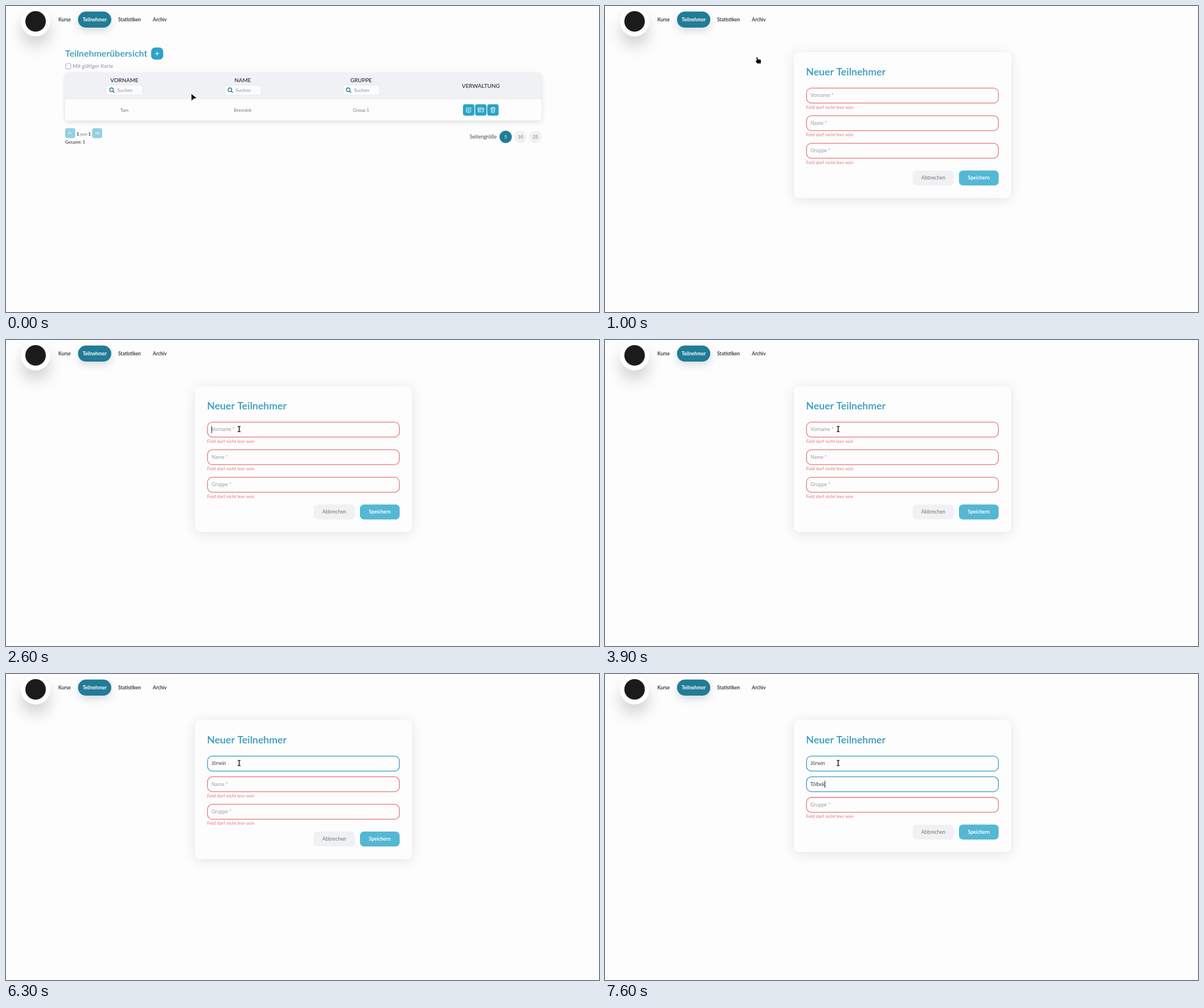
These frames come from a looping animation (1042 px wide and 538 px high, 8000 ms). An HTML page with a canvas:

```html
<!DOCTYPE html>
<html lang="de">
<head>
<meta charset="utf-8">
<style>
  html, body { margin: 0; width: 100%; height: 100%; overflow: hidden; background: #fdfdfd; }
  canvas { display: block; }
</style>
</head>
<body>
<canvas id="stage" width="1042" height="538"></canvas>
<script>
const ctx = document.getElementById('stage').getContext('2d');
const LOOP = 8000, STEP = 100;
const C = {
  page: '#fdfdfd', deep: '#217c97', teal: '#2ba3c7', title: '#349bbf', soft: '#54b7d4',
  pale: '#94d0e1', red: '#e4767a', ink: '#25292f', mid: '#6f7479', hint: '#9a9da3', chip: '#f0f1f3'
};

const FIRST = { word: 'Jörwin', keys: [4200, 4400, 4700, 4800, 5000, 5200] };
const LAST = { word: 'Tölbek', keys: [6700, 6900, 7100, 7300, 7400, 7600] };
const LIST_END = 900, FORM_START = 1000;

function text(str, x, y, size, color, weight = 400, align = 'left') {
  ctx.font = `${weight} ${size}px Lato, "Open Sans", sans-serif`;
  ctx.fillStyle = color;
  ctx.textAlign = align;
  ctx.fillText(str, x, y);
  return ctx.measureText(str).width;
}

function box(x, y, w, h, r, fill, stroke, line = 1) {
  ctx.beginPath();
  ctx.roundRect(x, y, w, h, r);
  if (fill) { ctx.fillStyle = fill; ctx.fill(); }
  if (stroke) { ctx.strokeStyle = stroke; ctx.lineWidth = line; ctx.stroke(); }
}

function disc(x, y, r, fill) {
  ctx.beginPath();
  ctx.arc(x, y, r, 0, Math.PI * 2);
  ctx.fillStyle = fill;
  ctx.fill();
}

function shadowed(color, blur, dy, draw) {
  ctx.save();
  ctx.shadowColor = color;
  ctx.shadowBlur = blur;
  ctx.shadowOffsetY = dy;
  draw();
  ctx.restore();
}

// Strokes an SVG path placed at x, y.
function line(d, x, y, color, width = 1) {
  ctx.save();
  ctx.translate(x, y);
  ctx.strokeStyle = color;
  ctx.lineWidth = width;
  ctx.lineCap = ctx.lineJoin = 'round';
  ctx.stroke(new Path2D(d));
  ctx.restore();
}

function shape(d, x, y, color) {
  ctx.save();
  ctx.translate(x, y);
  ctx.fillStyle = color;
  ctx.fill(new Path2D(d));
  ctx.restore();
}

function drawNav() {
  shadowed('rgba(0,0,0,.17)', 26, 17, () => disc(52, 28, 25.5, '#fff'));
  disc(52, 27, 18, '#1b1b1b');
  shadowed('rgba(30,60,80,.17)', 14, 6, () => box(126.5, 9.8, 58.5, 28.2, 14, C.deep));
  text('Kurse', 92, 27, 8.6, C.ink, 600);
  text('Teilnehmer', 155.8, 27, 8.6, '#fff', 700, 'center');
  text('Statistiken', 197, 27, 8.6, C.ink, 600);
  text('Archiv', 258, 27, 8.6, C.ink, 600);
}

function drawColumn(label, x, value) {
  text(label, x, 134.3, 9.8, C.ink, 500, 'center');
  box(x - 32, 139, 64.5, 18, 4, '#fafbfb', '#e6e8eb');
  line('M2.3 2.3 L4.8 4.8 M3.2 0 A3.2 3.2 0 1 1 -3.2 0 A3.2 3.2 0 1 1 3.2 0', x - 22.6, 147.2, C.deep, 1.4);
  text('Suchen', x - 12.4, 150.8, 8.4, '#8d9196');
  text(value, x, 185.5, 7.9, C.mid, 400, 'center');
}

function drawList() {
  text('Teilnehmerübersicht', 103.8, 89.3, 16.1, C.title, 600);
  box(255, 73, 21.3, 21.2, 7, C.teal);
  line('M-3.5 0 H3.5 M0 -3.5 V3.5', 265.5, 83.6, '#fff', 1);
  box(105, 101.5, 9, 9, 1.3, '#fff', '#a3a6aa');
  text('Mit gültiger Karte', 117, 109.3, 9, '#a8abaf', 700);

  shadowed('rgba(0,0,0,.12)', 9, 3, () => box(104, 117, 837, 84.5, 5, C.page));
  box(104, 117, 837, 47, [5, 5, 0, 0], '#f0f1f4');
  drawColumn('VORNAME', 208, 'Tam');
  drawColumn('NAME', 416, 'Brennlok');
  drawColumn('GRUPPE', 624, 'Group 1');
  text('VERWALTUNG', 834.3, 144, 9.8, C.ink, 500, 'center');

  for (let i = 0; i < 3; i++) box(803 + i * 21.3, 172.7, 20, 20, 4, C.teal);
  line('M-0.5 -3.5 H-3 Q-4 -3.5 -4 -2.5 V3 Q-4 4 -3 4 H2.5 Q3.5 4 3.5 3 V0.5 M-1.5 1.5 L-1 -0.5 L3 -4.5 L4.6 -3 L0.6 1 Z', 813, 182.7, '#fff');
  line('M-4.2 -3.5 H4.2 Q4.7 -3.5 4.7 -3 V3 Q4.7 3.5 4.2 3.5 H-4.2 Q-4.7 3.5 -4.7 3 V-3 Q-4.7 -3.5 -4.2 -3.5 M-4.5 -1 H4.5 M-2.8 1.4 H-0.5', 834.3, 182.7, '#fff');
  line('M-4 -3 H4 M-1.5 -3 V-4.5 H1.5 V-3 M-3.2 -3 L-2.8 4.5 H2.8 L3.2 -3 M-1 -1 V2.5 M1 -1 V2.5', 855.6, 182.7, '#fff', 0.9);

  box(104, 214.7, 17.7, 17.5, 4, C.pale);
  box(151.3, 214.7, 17.7, 17.5, 4, C.pale);
  line('M3.2 0 H-3.2 M-0.8 -2.4 L-3.2 0 L-0.8 2.4', 112.8, 223.4, '#fff', 0.8);
  line('M-3.2 0 H3.2 M0.8 -2.4 L3.2 0 L0.8 2.4', 160.1, 223.4, '#fff', 0.8);
  text('1', 124, 228, 7.9, C.ink, 600);
  text('von', 136.4, 228, 7.9, C.mid, 400, 'center');
  text('1', 149, 228, 7.9, C.ink, 600, 'right');
  text('Gesamt: 1', 104, 242.2, 7.8, '#55595f', 700);

  text('Seitengröße', 814.7, 233.2, 9, '#43474d');
  ['5', '10', '25'].forEach((n, i) => {
    const x = 878 + i * 26.1;
    disc(x, 230.1, 10.8, i ? C.chip : C.deep);
    text(n, x, 233.2, 8.3, i ? C.mid : '#fff', 400, 'center');
  });
}

const typed = ({ word, keys }, t) => word.slice(0, keys.filter(k => k <= t).length);

// Index of the field with a visible caret, or -1.
function caretField(t) {
  if (t >= 2600 && t < 3400) return 0;
  if (t >= FIRST.keys[0] && t < 5700) return 0;
  if (t >= 5800 && t < 6300 || t >= LAST.keys[0]) return 1;
  return -1;
}

function drawForm(t) {
  const fields = [['Vorname *', typed(FIRST, t)], ['Name *', typed(LAST, t)], ['Gruppe *', '']];
  const heights = fields.map(([, value]) => value ? 36.3 : 48.5);
  const buttonsY = 144 + heights.reduce((a, b) => a + b);

  shadowed('rgba(40,40,90,.12)', 20, 3, () => box(332, 81, 381.7, buttonsY + 48 - 81, 9, C.page));
  text('Neuer Teilnehmer', 353.3, 121.5, 17.75, C.title, 600);

  let y = 144;
  fields.forEach(([label, value], i) => {
    box(354.1, y + 0.4, 337.2, 26.2, 8.5, C.page, value ? C.title : C.red, 1.3);
    const width = text(value || label, 361, y + 16.3, 8.8, value ? '#3f444a' : C.hint);
    if (!value) text('Feld darf nicht leer sein', 353.5, y + 36.6, 8.1, C.red);
    if (caretField(t) === i) {
      ctx.fillStyle = '#222';
      ctx.fillRect(Math.round(361 + (value ? width : 0)), y + 7.3, 1, 12.5);
    }
    y += heights[i];
  });

  box(540.5, buttonsY - 0.3, 72.7, 26.3, 7, C.chip);
  text('Abbrechen', 576.9, buttonsY + 15.8, 8.8, C.mid, 400, 'center');
  box(622, buttonsY - 0.3, 69.7, 26.3, 7, C.soft);
  text('Speichern', 656.8, buttonsY + 15.8, 8.6, '#fff', 700, 'center');
}

function glide(t, start, end, from, to) {
  const p = Math.min(1, Math.max(0, (t - start) / (end - start)));
  const e = p * p * (3 - 2 * p);
  return from.map((v, i) => v + (to[i] - v) * e);
}

function drawCursor(t) {
  const [x, y] = t <= FORM_START
    ? glide(t, 0, 800, [325.8, 154.8], [267, 90])
    : glide(t, FORM_START, 2400, [267, 90], [409.7, 156.5]);
  const onPlus = t <= FORM_START && x < 276.5 && y < 94.3;
  const onField = t > FORM_START && x > 354 && y > 144;
  if (onField) {
    line('M-2 -4.7 Q0 -4.7 0 -3.7 Q0 -4.7 2 -4.7 M0 -3.7 V3.7 M-2 4.7 Q0 4.7 0 3.7 Q0 4.7 2 4.7', x, y, '#000', 1.3);
  } else if (onPlus) {
    shape('M-0.9 0.6 Q0 -0.5 0.9 0.6 L1.4 3.7 L5.4 4.2 Q7 4.5 7 6 L6.6 11 H0.6 L-1.9 7.6 Q-2.6 6.3 -1.4 5.9 L0 6.6 Z', x, y, '#000');
  } else {
    shape('M0 0 L8.8 7 L4 7.9 L0.3 11.8 Z', x, y, '#000');
  }
}

function frame(now) {
  const t = Math.floor(now % LOOP / STEP) * STEP;
  ctx.fillStyle = C.page;
  ctx.fillRect(0, 0, 1042, 538);
  drawNav();
  if (t < LIST_END) drawList();
  else if (t >= FORM_START) drawForm(t);
  drawCursor(t);
}

const begin = performance.now();
function tick() {
  frame(performance.now() - begin);
  requestAnimationFrame(tick);
}
tick();
</script>
</body>
</html>
```
